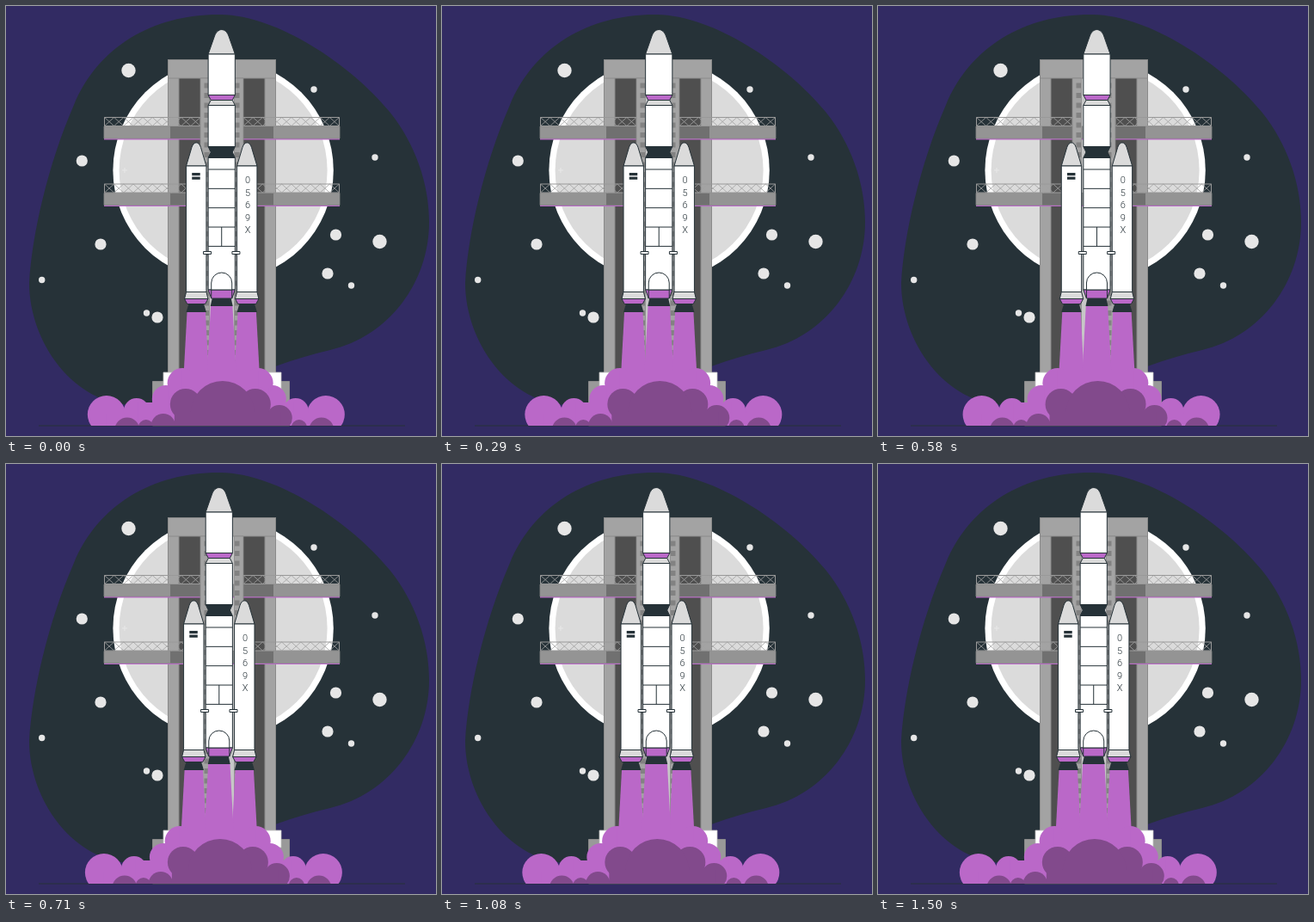
Recreate the animation shown at these times as an HTML page with a canvas. Size 500 by 500 pixels, loop 1540 ms.

```html
<!DOCTYPE html>
<html lang="en">
<head>
<meta charset="utf-8">
<title>Rocket launch</title>
<style>
html, body { margin: 0; width: 100%; height: 100%; overflow: hidden; background: #322b63; }
canvas { display: block; width: 500px; height: 500px; }
</style>
</head>
<body>
<canvas id="stage" width="500" height="500"></canvas>
<script>
const ctx = document.getElementById('stage').getContext('2d');
const NIGHT = '#322b63', INK = '#263238', PURPLE = '#ba68c8', PLUM = '#824a8c';
const WHITE = '#fff', PALE = '#dbdbdb', STEEL = '#a3a3a3', EDGE = '#8a8a8a', DARK = '#4f4f4f';
const AXIS = 250.9, GROUND = 488;
const BOOSTER_GAP = 29.5;

function paint(fill, stroke, width = 1) {
  if (fill) { ctx.fillStyle = fill; ctx.fill(); }
  if (stroke) { ctx.strokeStyle = stroke; ctx.lineWidth = width; ctx.stroke(); }
}
function box(x1, y1, x2, y2, fill, stroke, width) {
  ctx.beginPath();
  ctx.rect(x1, y1, x2 - x1, y2 - y1);
  paint(fill, stroke, width);
}
function line(x1, y1, x2, y2, color = INK, width = 1) {
  ctx.beginPath();
  ctx.moveTo(x1, y1);
  ctx.lineTo(x2, y2);
  paint(null, color, width);
}
function disc(x, y, r, fill) {
  ctx.beginPath();
  ctx.arc(x, y, r, 0, Math.PI * 2);
  paint(fill);
}
// Discs at equal distance on both sides of an axis
function pair(axis, reach, y, r, fill) {
  disc(axis - reach, y, r, fill);
  disc(axis + reach, y, r, fill);
}
// Symmetric section from half width w1 at y1 to w2 at y2
function taper(cx, y1, w1, y2, w2, fill, stroke = INK) {
  ctx.beginPath();
  ctx.moveTo(cx - w1, y1);
  ctx.lineTo(cx + w1, y1);
  ctx.lineTo(cx + w2, y2);
  ctx.lineTo(cx - w2, y2);
  ctx.closePath();
  paint(fill, stroke);
}
function nose(cx, half, base, tip, shoulder, top) {
  ctx.beginPath();
  ctx.moveTo(cx - half, base);
  ctx.lineTo(cx - tip, shoulder);
  ctx.bezierCurveTo(cx - tip * 0.6, top, cx + tip * 0.6, top, cx + tip, shoulder);
  ctx.lineTo(cx + half, base);
  ctx.closePath();
  paint(PALE, INK);
}

function drawSky() {
  ctx.fillStyle = NIGHT;
  ctx.fillRect(0, 0, 500, 500);
  ctx.beginPath();
  ctx.moveTo(250, 10);
  ctx.bezierCurveTo(315, 11, 400, 67, 446, 123);
  ctx.bezierCurveTo(476, 160, 492, 207, 492, 251);
  ctx.bezierCurveTo(492, 322, 445, 384, 377, 400);
  ctx.bezierCurveTo(290, 420, 220, 464, 150, 464);
  ctx.bezierCurveTo(78, 464, 27, 390, 27, 322);
  ctx.bezierCurveTo(30, 268, 48, 186, 79, 115);
  ctx.bezierCurveTo(107, 47, 172, 9, 250, 10);
  paint(INK);

  const star = r => ([x, y]) => disc(x, y, r, '#e6e6e6');
  [[142.5, 75], [434.5, 274]].forEach(star(8.2));
  [[88.3, 180], [110, 277], [176, 362], [383.5, 266], [374, 311]].forEach(star(6.6));
  [[358, 97], [429, 176], [41.7, 318.5], [163.5, 357], [401.5, 325]].forEach(star(3.7));

  disc(252.6, 191, 128.2, WHITE);
  disc(252.6, 191, 121, PALE);
  line(135, 191, 141, 191, '#e8e8e8');
  line(138, 188, 138, 194, '#e8e8e8');
}

function drawTruss(x1, x2, top, bottom) {
  const count = 10, step = (x2 - x1) / count;
  for (let i = 0; i < count; i++) {
    const x = x1 + i * step;
    line(x, top, x + step, bottom, STEEL, 0.8);
    line(x, bottom, x + step, top, STEEL, 0.8);
  }
  box(x1, top, x2, bottom, null, '#999');
}

function drawPlatform(y) {
  box(114, y + 14, 388, y + 15.5, PURPLE);
  box(114, y, 388, y + 14, '#949494', EDGE, 0.8);
  box(191, y, 228, y + 14, '#707070');
  box(274, y, 311, y + 14, '#707070');
  drawTruss(114.5, 226, y - 10.5, y - 0.5);
  drawTruss(276, 387.5, y - 10.5, y - 0.5);
}

function drawTower() {
  box(201, 84, 301, 440, DARK);
  box(236, 84, 266, 440, '#c7c7c7');
  for (const x of [188.5, 301]) box(x, 62.5, x + 12.5, 440, STEEL, EDGE);
  box(188.5, 62.5, 313.5, 84, STEEL, EDGE);
  for (const y of [140, 217.5]) drawPlatform(y);
  for (const x of [226, 265.5]) box(x, 84, x + 10.5, 440, STEEL, EDGE, 0.8);
  for (let y = 89.5; y < 425; y += 11.5) {
    for (const x of [230.5, 266]) box(x, y, x + 5.5, y + 6, '#828282');
  }
  box(170.5, 436.5, 329.5, GROUND, '#999', EDGE);
  box(183, 426, 320, 446, WHITE, '#bdbdbd', 0.8);
  line(38, GROUND, 464, GROUND);
}

function drawBooster(cx) {
  nose(cx, 11.7, 186, 5.3, 164.5, 157);
  box(cx - 11.7, 186, cx + 11.7, 332.5, WHITE, INK);
  taper(cx, 332.5, 11.7, 340.5, 13.7, PALE);
  taper(cx, 340.5, 13.7, 346.5, 10.5, PURPLE);
  taper(cx, 347, 9, 356, 11.7, INK, null);
}

function drawCore() {
  const wide = 15.6, slim = 12.5;
  nose(AXIS, wide, 56, 8.6, 36, 24.7);
  taper(AXIS, 56, wide, 103.5, wide, WHITE);
  taper(AXIS, 103.5, wide, 109.5, slim, PURPLE);
  taper(AXIS, 109.5, slim, 115.5, wide, PALE);
  taper(AXIS, 115.5, wide, 163.5, wide, WHITE);
  taper(AXIS, 163.5, wide, 170, slim, INK);
  taper(AXIS, 170, slim, 176.5, wide, INK);
  taper(AXIS, 176.5, wide, 330, wide, WHITE);
  for (let i = 0; i < 5; i++) {
    const y = 190 + i * 22.35;
    line(AXIS - wide, y, AXIS + wide, y);
  }
  line(AXIS, 257, AXIS, 279.4);

  taper(AXIS, 330, wide, 340, 12, PURPLE);
  ctx.beginPath();
  ctx.arc(AXIS, 322, 12, Math.PI, 0);
  ctx.lineTo(AXIS + 12, 330);
  ctx.lineTo(AXIS - 12, 330);
  ctx.closePath();
  paint(WHITE, INK);
  for (const x of [AXIS - 12, AXIS + 12]) line(x, 330, x, 340);
  taper(AXIS, 340, 11, 349, 13, INK, null);
}

function drawRocket() {
  const left = AXIS - BOOSTER_GAP, right = AXIS + BOOSTER_GAP;
  for (const cx of [left, right]) taper(cx, 356, 10.7, 428, 14.6, PURPLE, null);
  taper(AXIS, 349, 12.7, 428, 17, PURPLE, null);
  drawBooster(left);
  drawBooster(right);
  drawCore();
  for (const x of [AXIS - 16.7, AXIS + 16.7]) box(x - 4.5, 285.5, x + 4.5, 288.5, WHITE, INK);
  for (const y of [194, 198.6]) box(left - 5, y, left + 4.5, y + 3.2, INK);

  ctx.fillStyle = INK;
  ctx.font = '300 11px Roboto, sans-serif';
  ctx.textAlign = 'center';
  [...'0569X'].forEach((glyph, i) => ctx.fillText(glyph, right + 0.8, 206.3 + i * 14.4));
}

function drawSmoke() {
  ctx.save();
  ctx.beginPath();
  ctx.rect(0, 0, 500, GROUND);
  ctx.clip();

  pair(244.5, 127.5, 475, 22, PURPLE);
  pair(244.5, 92.5, 471, 15, PURPLE);
  pair(248, 62, 457, 16, PURPLE);
  pair(249.3, 44, 438.5, 17.5, PURPLE);
  box(117, 474, 372, GROUND, PURPLE);
  box(154, 461, 335, GROUND, PURPLE);
  box(190, 444, 306, GROUND, PURPLE);
  box(205, 424, 294, GROUND, PURPLE);

  pair(254, 113, 493, 14.5, PLUM);
  pair(252, 89, 490, 9, PLUM);
  disc(183, 488, 14, PLUM);
  disc(318, 479, 15, PLUM);
  pair(249.5, 40.5, 463, 18, PLUM);
  disc(252, 473, 37, PLUM);
  box(196, 472, 320, GROUND, PLUM);
  ctx.restore();
}

// Horizontal shake in ten equal linear steps; the second half mirrors the first
const SWAY = [0, -1, 2, -4, 4, -4];
const LOOP = 1540, PERIOD = 1500, FRAME = 1000 / 24, LEAD = 25;
const swayAt = step => SWAY[5 - Math.abs(5 - step)];

function shakeAt(time) {
  const tick = Math.floor((time % LOOP + 5) / FRAME);
  const pos = (tick * FRAME + LEAD) % PERIOD / PERIOD * 10;
  const step = Math.floor(pos);
  return swayAt(step) + (swayAt(step + 1) - swayAt(step)) * (pos - step);
}

let start = null;
function render(now) {
  if (start === null) start = now;
  drawSky();
  drawTower();
  ctx.save();
  ctx.translate(shakeAt(now - start), 0);
  drawRocket();
  drawSmoke();
  ctx.restore();
  requestAnimationFrame(render);
}
requestAnimationFrame(render);
</script>
</body>
</html>
```
